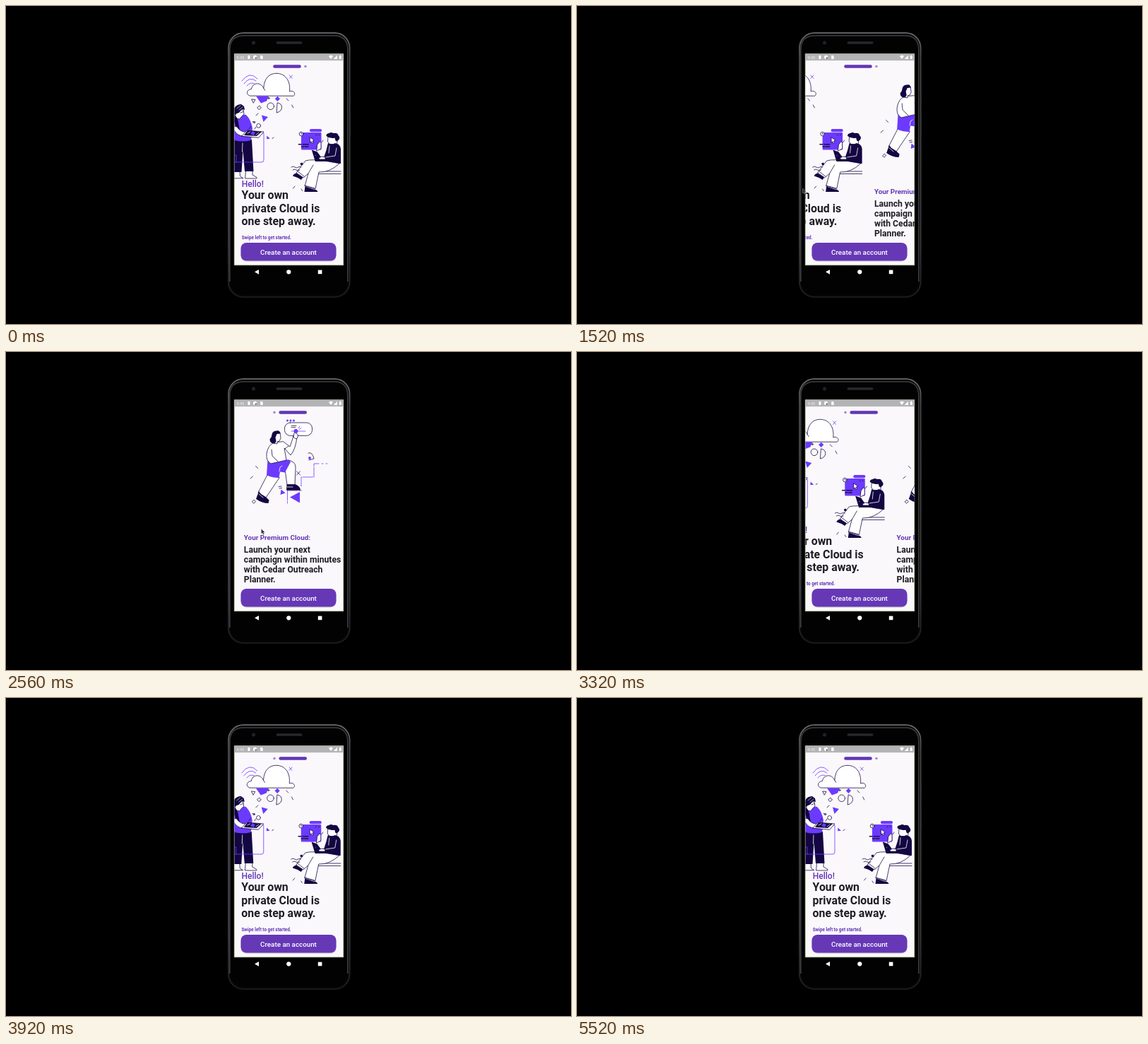
Animation of 800 by 450 pixels, one loop 5.68 s. Source, as an HTML page:

```html
<!DOCTYPE html>
<html lang="en">
<head>
<meta charset="utf-8">
<title>Onboarding swipe</title>
<style>
  html, body { margin: 0; width: 100%; height: 100%; overflow: hidden; background: #000; }
  svg { display: block; width: 100%; height: 100%; }
  text { font-family: Roboto, Arial, sans-serif; font-weight: 700; fill: #1f1c24; }
  .art { fill: none; stroke: #1b1046; stroke-width: .8; stroke-linecap: round; stroke-linejoin: round; }
  .n { fill: #130642; stroke: none; }
  .p { fill: #6c3aff; stroke: none; }
  .w { fill: #fff; }
  .pl { stroke: #6c3aff; }
  .wl { stroke: #fff; }
  text.accent, .accent { fill: #6236b5; }
</style>
</head>
<body>
<svg viewBox="0 0 800 450">
  <defs>
    <clipPath id="screen"><rect x="323.5" y="77" width="154.3" height="289"/></clipPath>
    <clipPath id="body"><rect x="314" y="38" width="173.5" height="374" rx="22"/></clipPath>
    <linearGradient id="rim" x2="0" y2="1">
      <stop offset="0" stop-color="#6a6b6e"/><stop offset=".1" stop-color="#48494b"/>
      <stop offset=".8" stop-color="#3a3b3d"/><stop offset="1" stop-color="#1c1c1e"/>
    </linearGradient>
  </defs>

  <!-- phone -->
  <rect x="315" y="38.2" width="171.600" height="373.600" rx="21" fill="#060607" stroke="url(#rim)" stroke-width="1.800"/>
  <path d="M316.800 390V62q0-20 20-20h128q19 0 19 20v328" fill="none" stroke="#3c3d40" stroke-width="1.600"/>
  <rect x="318.200" y="43" width="164.600" height="366" rx="18" fill="#020203"/>
  <path d="M487.400 123v16M487.400 153v31" stroke="#2c2d30"/>
  <circle cx="350.5" cy="52" r="2.6" fill="#202125"/>
  <rect x="382.5" y="50.3" width="37" height="3.4" rx="1.7" fill="#28282a"/>
  <rect x="323.2" y="67.8" width="154.6" height="299" fill="#fbf8fc" stroke="#a9c286" stroke-width=".7"/>
  <rect x="323.3" y="67.600" width="154.400" height="9.600" fill="#b4b3b5"/>
  <g fill="#fff">
    <text x="326.5" y="74.7" font-size="5.5" style="font-weight:400;fill:#eee">9:45</text>
    <rect x="342.4" y="70" width="3" height="5" rx=".6"/>
    <circle cx="352.6" cy="72.4" r="2.6"/>
    <path d="M352.6 72.4h2.6a2.6 2.6 0 0 1-2.6 2.6z" fill="#777"/>
    <path d="M360.2 70h2.4l1 1v4h-3.4z"/>
    <path d="M457 71q3-2.4 6 0l-3 4zM469 69.8v5.2h-5.2zM471.8 70.4h.8v-.8h1.4v.8h.8V75h-3z"/>
    <path d="M352 376.3l6-3.4v6.8z"/>
    <circle cx="400.3" cy="376.3" r="3.1"/>
    <rect x="441.8" y="373.6" width="5.6" height="5.6"/>
  </g>

  <g clip-path="url(#screen)">
    <g id="pages">
      <!-- first page -->
      <g class="art">
        <path class="pl" d="M334 106q11-15 22-3M337 110q8-11 17-4M341 113q5-6 11-3M401.3 98l4 4.4m0-4.4l-4 4.4"/>
        <path class="w" d="M345 127C339 125 341 118 347.500 117.500C349 108 361 107 364.800 116.500C365.500 102 373 95.300 383 95.300C395 95.500 403 105 401.500 121C407 118.500 411 124 407.500 127z"/>
        <path d="M364.800 116.500l2 3"/>
        <path class="p" d="M354 127.5h18l-3 7-8 3zM380.8 131.3l3.7-3.6 3.5 3.6-3.6 3.7zM362 154.5l9 2.5-6.5 7zM369.4 183.5l4.5 4.2-4.8.6z"/>
        <path d="M348 132l5 .5-2.5 4.5zM356 143.5l3-2.4 2.5 3-3 2.4zM384.5 137q6 1 6 6.5t-7 7.5zM397 131l3 3M404.7 140l2 4M354 155l3-3M377 187.6l2-1.4M349 163.5l3 1M372 129v3m-1.5-1.5h3"/>
        <circle cx="374.7" cy="141.8" r="4.8"/>
        <!-- standing figure -->
        <path class="w" d="M323 243.500V234h8l.5 7 4 2.500zM340 233h9v6l6 3.500v1.500h-16z"/>
        <path class="n" d="M323 189h25l2.500 45h-12.500l-2.500-30-2 31H323z"/>
        <path class="wl" d="M335 194l-.5 12"/>
        <path class="pl" d="M323 221h39q3 0 3-3v-38h-14M323 211h3v10"/>
        <path class="p" d="M323 158q9-6 17-4 7 7 9 19l-2 17q-12 3-24 0z"/>
        <path class="w" d="M326 147h10l1 6-4 4-2 3-6-1z"/>
        <path class="n" d="M323 145q3-6 10-6l4 3 1 5-4-1-4 5-3 1-4 3zM323 154q4 2 6 10 1 10 4 16l-3-1q-5-8-7-15z"/>
        <path class="wl" d="M327 145l5-4m-2 6l5-4" stroke-width=".6"/>
        <path d="M332 151l4-1.500"/>
        <path class="w" d="M323 176q5 8 13 8l7-2-2-4q-9 1-14-7l-4-1z"/>
        <path class="w" d="M334 184l7-8 24 2-7 8z"/>
        <path class="n" d="M337 183l5-7 20 2-7 6z"/>
        <path class="p" d="M346 181l3-4 4 2-2 4z"/>
        <path class="wl" d="M342 180l4-2m8 4l4-3"/>
        <circle class="w" cx="357.7" cy="169.4" r="2.9"/><circle cx="351.5" cy="164.5" r="1.2"/>
        <path d="M344 174l3-4m5 4l2-3"/>

        <rect class="p" x="418" y="179" width="28.5" height="24.5" rx="1"/>
        <rect class="p" x="430" y="174" width="17" height="4.2" rx="2"/>
        <circle class="w" cx="418" cy="181" r="2.8"/>
        <path d="M418 179.6v1.6h1M438.5 182.3h1.5m2.5 0h1.5"/>
        <path class="w" d="M430.5 186l6 4-2.4 1 1 3-1.6.5-1.2-2.8-1.5 1.7z"/>
        <path d="M414.3 195.7h4m2 0h8M418.5 199h3m1.5 0h5" stroke-width="1.4"/>
        <path class="w" d="M441 196l3-4 2 1v9l-6 3z"/>
        <!-- seated figure -->
        <path d="M446 234h28M441 237.500h33"/>
        <path class="w" d="M456 185l-.5 7 3 3.500 10 .5 1-9z"/>
        <path class="n" d="M453.500 184q-.5-3.500 4-4 3-2 6 0 6-1 7 3 3 3 1 6l-3 2.500-2-1-1-4q-6 2-12-2.500z"/>
        <path class="n" d="M456 194q5 3 10 0 7 1 8 8v21l-22-1-10-3 .5-5 8-1 3-9z"/>
        <path class="wl" d="M468 201l-2 11-13 2M458 198l-1 10"/>
        <path class="w" d="M456 220q-22-4-32-1-4 5-13 17l10 7 7-6-5 18 15 4 5-24q15 1 29-12z"/>
        <path d="M428 237l7-12m-12 29l14 4M413 234l9 7"/>
        <path class="n" d="M432.8 203.5l8 3 8 11 6 .5v2h-17zM411 236.500l9.500 6-2.500 3.500q-6-4-12-5.500 1-3 5-4zM423.500 255.500l12 4q5 0 6 3.500h-19z"/>
        <circle cx="438.5" cy="211.5" r=".8" fill="#fff"/>
        <path class="w" d="M443 215l4-2 5 1v3h-8z"/>
        <path class="n" d="M416.5 222.5l3-1 1 3-3 1z"/>
        <path d="M404 228q2.5-2 5 0t5 0 4 0M406 232q2.5-2 5 0t5 0M406.5 258l2.500-3M418 259l1.500 2.500M449 190l-2 3"/>
      </g>
      <text class="accent" x="333.7" y="256" font-size="12" style="font-weight:500">Hello!</text>
      <g font-size="15.85">
        <text x="333.6" y="273.2">Your own</text>
        <text x="333.6" y="291.7">private Cloud is</text>
        <text x="333.6" y="310.2">one step away.</text>
      </g>
      <text class="accent" x="333.7" y="329.7" font-size="6.35">Swipe left to get started.</text>

      <!-- second page -->
      <g transform="translate(154.5)">
        <g class="art">
          <g class="p"><circle cx="398.4" cy="97" r="1.5"/><circle cx="402.9" cy="97" r="1.5"/><circle cx="407.4" cy="97" r="1.5"/></g>
          <rect class="w" x="394.5" y="100" width="39" height="18.4" rx="8"/>
          <path d="M404 104.3h7m-7 2.4h6"/>
          <path class="pl" d="M404 112h20M414 108l2-3m-1 4.5l3-2"/>
          <path class="pl" d="M398.5 196v18M418 190v-13h18v-19h7m4 0h2m4 0h2M398.5 196h20" stroke-dasharray="14 1.5"/>
          <path class="p" d="M402 205.5l14-7.5v15.5zM389.5 194.5l6 5-7 2.5z"/>
          <path class="w" d="M400 153q10 2 10 10l-1 25h-11l-3-22zM370 174l-13 25 11 7 19-28z"/>
          <path class="n" d="M397.5 187.3h12.5q7 3 7 8.5h-20zM358 197l3 4q6 3 11.5 8.5l-1 4.5q-9 0-17.5-6z"/>
          <path class="wl" d="M398 191h8M358 201l6 5"/>
          <path class="p" d="M370.5 152l30 .5 2.5 3-8 15-7-1-1.5 8.5q-9 0-17.500-3.500z"/>
          <path class="wl" d="M387 169l1-6 3-2"/>
          <path class="w" d="M380 128q-9 3-11 16-1 10 6 14l22-5-3-17 9 10q7-8 9-26l-5-1q-2 7-5 15l-9-7z"/>
          <path d="M376 138l1 9 8 8M395 137l5-4"/>
          <path class="w" d="M380 114h8l1 8-2 4-3 1v3l-5-1z"/>
          <path class="n" d="M388.500 115.500q-1-5-5-4-6 0-7 5 0 4-3 7 0 4 3 5.500 5 1.500 6-3l-1-5 2-5z"/>
          <path class="w" d="M407 120l1-5q2-4 2.500 0l3 2-1 5q-3 2-5.500-2z"/>
          <circle class="p" cx="410.400" cy="112" r="2.900"/>
          <path d="M411.500 169l5 5m0-5l-5 5M386 190.500l4-.5m-3 3l3.500-.5M346 179l3.500-3M353.500 161.500l3 3M348.700 211.500l2.500-2.300 2.300 2.500-2.500 2.300zM428 143q6-2 8 8l-7 2"/>
          <circle class="p" cx="430" cy="150" r="1.900"/>
        </g>
        <text class="accent" x="336.8" y="265.5" font-size="9.85">Your Premium Cloud:</text>
        <g font-size="12.2">
          <text x="336.8" y="283.7">Launch your next</text>
          <text x="336.8" y="297.9">campaign within minutes</text>
          <text x="336.8" y="312.1">with Cedar Outreach</text>
          <text x="336.8" y="326.3">Planner.</text>
        </g>
      </g>
    </g>
  </g>

  <rect id="pill" y="83.2" width="39.6" height="4.6" rx="2.2" class="accent"/>
  <circle id="dot" cy="85.5" r="1.8" fill="#a48bd6"/>
  <rect x="332.5" y="336" width="135" height="25.5" rx="8" opacity=".2"/>
  <rect x="332.5" y="335" width="135" height="25.5" rx="8" fill="#6638b6"/>
  <text x="400" y="351.5" font-size="9.8" text-anchor="middle" style="font-weight:500;fill:#fff">Create an account</text>

  <g clip-path="url(#body)">
    <path id="cursor" d="M0 0v6.6l1.6-1.3 1.2 2.6 1.2-.6-1.2-2.5h2.2z" fill="#27262b" stroke="#aaa8ae" stroke-width=".5"/>
  </g>
</svg>
<script>
const LOOP = 5680, STEP = 40, PAGE = 154.5;
const $ = id => document.getElementById(id);

// time, x, y of the pointer
const path = [
  [520, 462, 25], [1080, 436, 260], [1200, 436, 260], [1600, 306, 258],
  [2300, 306, 252], [2560, 361.5, 250.5], [2840, 374, 251], [3040, 374, 251],
  [3300, 492, 250], [4240, 492, 252], [4720, 306, 256]
];

// damped settle from 0 to 1
function settle(ms) {
  const u = Math.max(0, ms) / 100;
  return 1 - (1 + u) * Math.exp(-u);
}

function pointer(t) {
  const next = path.findIndex(k => k[0] > t);
  if (next < 1) return (next ? path.at(-1) : path[0]).slice(1);
  const a = path[next - 1], b = path[next];
  const u = (t - a[0]) / (b[0] - a[0]), e = u * u * (3 - 2 * u);
  return [1, 2].map(i => a[i] + (b[i] - a[i]) * e);
}

function draw(now) {
  const t = Math.floor(now % LOOP / STEP) * STEP;
  const shift = PAGE * (settle(t - 1366) - settle(t - 3051));
  const second = t >= 2240 && t < 4000;
  $('pages').setAttribute('transform', `translate(${-shift.toFixed(2)})`);
  $('pill').setAttribute('x', second ? 386.4 : 378.2);
  $('dot').setAttribute('cx', second ? 380 : 424);
  $('cursor').setAttribute('transform', `translate(${pointer(t)})`);
}

const start = performance.now();
(function tick() {
  draw(performance.now() - start);
  requestAnimationFrame(tick);
})();
</script>
</body>
</html>
```
